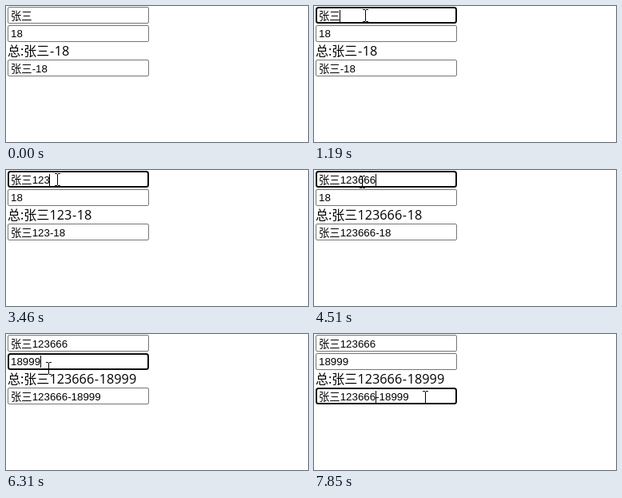
Write an HTML page that moves like this. It is 378 px wide and 170 px high and loops after 8 s.

```html
<!DOCTYPE html>
<html lang="zh-CN">
<head>
<meta charset="utf-8">
<title>Two-way binding demo</title>
<style>
  html, body { margin: 0; width: 100%; height: 100%; overflow: hidden; background: #fff; }
  svg { display: block; width: 378px; height: 170px; }
  .value { font: 13.333px "Liberation Sans", Arial, "Noto Sans CJK SC", "Noto Sans CJK", sans-serif; }
  .total { font: 16px "Noto Sans CJK SC", "Noto Sans CJK", sans-serif; }
  .latin { font: 16.3px "Open Sans", "Noto Sans", sans-serif; }
</style>
</head>
<body>
<svg viewBox="0 0 378 170">
  <g id="fields"></g>
  <text id="total" class="total" x="2" y="62"></text>
  <rect id="caret" width="1" height="15" shape-rendering="crispEdges"/>
  <path id="arrow" d="M.5 .5V16.5L4.5 12.8L7 18.5L9.5 17.5L7.2 11.5H11.5Z" fill="#fff" stroke="#000"/>
  <path id="beam" d="M-3 -8h3v1h1v-1h3v1h-3v14h3v1h-3v-1h-1v1h-3v-1h3v-14h-3z" shape-rendering="crispEdges"/>
</svg>
<script>
const LOOP = 8000, BLINK = 530;
const $ = id => document.getElementById(id);

const tops = [1, 24, 67], baselines = [17, 39, 83];
$('fields').innerHTML = tops.map((y, i) =>
  `<rect/><text class="value" x="6" y="${baselines[i]}"></text>`).join('');
const boxes = [...$('fields').querySelectorAll('rect')];
const values = [...$('fields').querySelectorAll('text')];

// Typed characters and clicks, in ms
const nameKeys = [2320, 2650, 2990, 3590, 3850, 4050];
const ageKeys = [5910, 6110, 6310];
const clicks = [1190, 5050, 7640];
const caretResets = [...clicks, ...nameKeys, ...ageKeys];

// Pointer moves: start, end, number of steps, target x, target y
const moves = [
  [230, 720, 8, 65, -8],
  [790, 1000, 4, 64, 12],
  [4510, 4510, 1, 60, 15],
  [4580, 4710, 3, 53, 43],
  [6840, 7110, 5, 73, 88],
  [7240, 7310, 2, 75, 90],
  [7380, 7580, 4, 75, 79],
  [7710, 7850, 3, 139, 79]
];

const countUntil = (times, t) => times.filter(k => k <= t).length;
const smooth = p => p * p * (3 - 2 * p);

function pointer(t) {
  let x = 251, y = 157;
  for (const [start, end, steps, tx, ty] of moves) {
    if (t < start) break;
    const span = (end - start) || 1;
    const done = Math.floor((t - start) / span * (steps - 1) + 0.001) + 1;
    const p = smooth(Math.min(done / steps, 1));
    x += (tx - x) * p;
    y += (ty - y) * p;
  }
  return [Math.round(x), Math.round(y)];
}

function caretX(text) {
  let x = 6;
  for (const ch of text) x += ch > '\u00ff' ? 13.333 : 7.415;
  return Math.floor(x);
}

const latin = (s, dx = 0) => `<tspan class="latin" dx="${dx}">${s}</tspan>`;

function setBox(box, top, focused, hovered) {
  const w = focused ? 2 : 1;
  const attrs = {
    x: 2 + w / 2, y: top + w / 2, width: 177 - w, height: 21 - w,
    rx: focused ? 2.5 : 1.5, fill: '#fff', 'stroke-width': w,
    stroke: focused ? '#101010' : hovered ? '#4f4f4f' : '#767676'
  };
  for (const key in attrs) box.setAttribute(key, attrs[key]);
}

function draw(t) {
  const digits = '123666'.slice(0, countUntil(nameKeys, t));
  const name = '张三' + digits;
  const age = '18' + '9'.repeat(countUntil(ageKeys, t));
  const focus = countUntil(clicks, t) - 1;
  const [px, py] = pointer(t);
  const shown = t >= 70;

  [name, age, name + '-' + age].forEach((s, i) => values[i].textContent = s);
  $('total').innerHTML = '总' + latin(':') + '张三' + latin(digits) +
    latin('-', 0.6) + latin(age, 0.6);

  let overText = py >= 46 && py < 67 && px >= 2 && px < 164;
  tops.forEach((top, i) => {
    const hovered = px >= 2 && px < 179 && py >= top && py < top + 21;
    overText = overText || hovered;
    setBox(boxes[i], top, i === focus, hovered);
  });

  const lastReset = Math.max(...caretResets.filter(k => k <= t));
  const caretOn = focus >= 0 && Math.floor((t - lastReset) / BLINK) % 2 === 0;
  $('caret').style.display = caretOn ? '' : 'none';
  if (caretOn) {
    $('caret').setAttribute('x', caretX(focus === 1 ? age : name));
    $('caret').setAttribute('y', baselines[focus] - 12);
  }

  for (const id of ['arrow', 'beam']) {
    $(id).style.display = shown && (id === 'beam') === overText ? '' : 'none';
    $(id).setAttribute('transform', `translate(${px} ${py})`);
  }
}

const begin = performance.now();
function tick() {
  draw((performance.now() - begin) % LOOP);
  requestAnimationFrame(tick);
}
tick();
</script>
</body>
</html>
```
